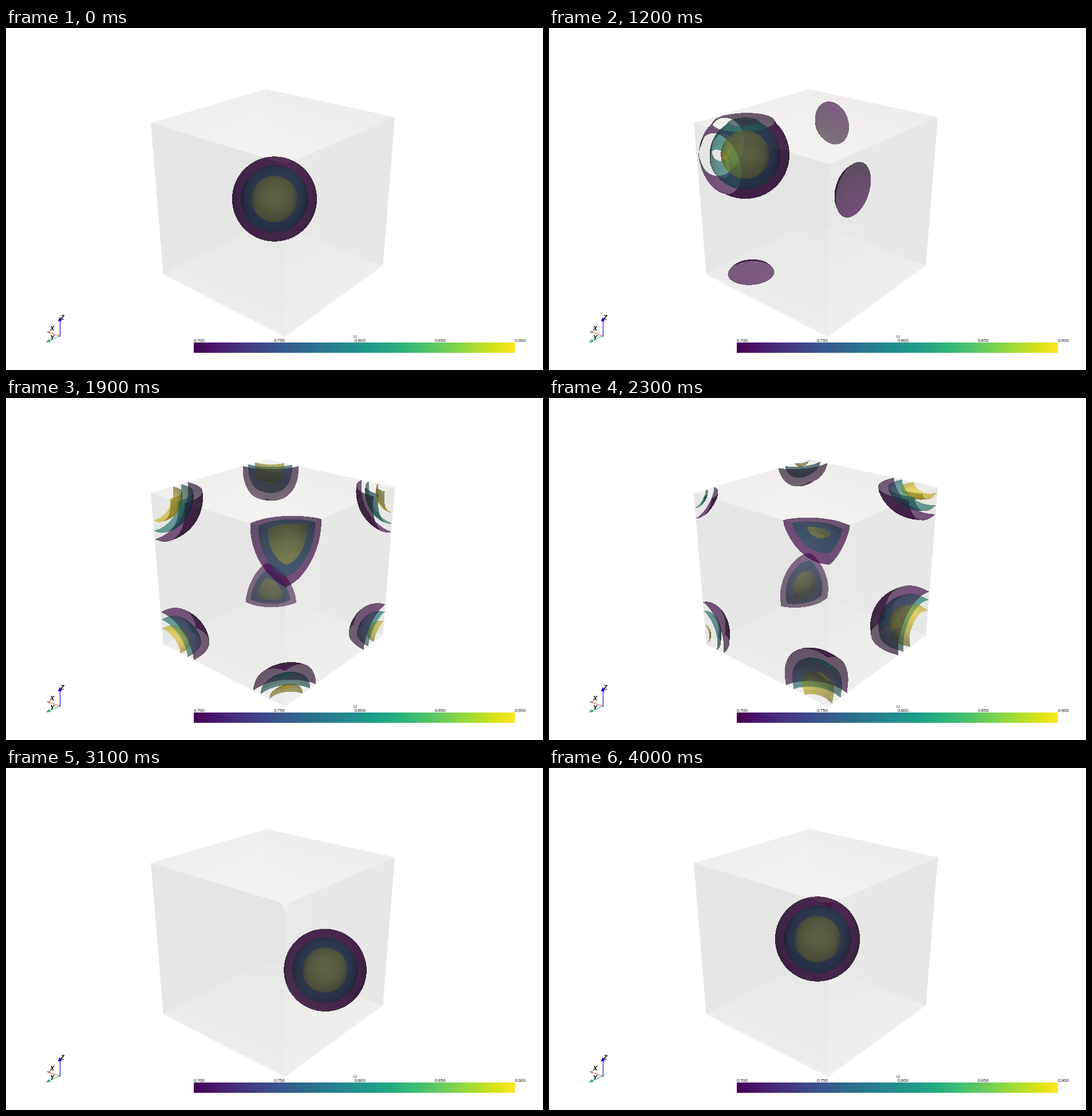
A matplotlib script that plays this animation: 938x597 px, repeating every 4.1 s.

```python
from itertools import product

import numpy as np
import matplotlib.pyplot as plt
from matplotlib.animation import FuncAnimation

W, H, DPI = 938, 597, 100
FRAMES, STEPS = 41, 40

# Camera looking at the middle of the unit cube
EYE = np.array([-1.8, 3.2, 2.1])
MID = np.full(3, 0.5)
FOCAL = H / 2 / np.tan(np.radians(15))
NEAR, FAR = 2.165, 5.634
CORNER_CLIP = 3.063

back = (EYE - MID) / np.linalg.norm(EYE - MID)
right = np.cross([0, 0, 1], back)
right /= np.linalg.norm(right)
up = np.cross(back, right)
VIEW = np.array([right, up, back])

# Iso surfaces: radius and colour
CELL = 0.025
SHELLS = [
    (0.2585, np.array([68, 1, 84]) / 255),
    (0.2055, np.array([33, 145, 140]) / 255),
    (0.1415, np.array([253, 231, 37]) / 255),
]
R_MAX = SHELLS[0][0]
SHELL_ALPHA, CUBE_ALPHA = 0.7, 0.1


def light(elevation, azimuth, power, colour=(1, 1, 1)):
    e, a = np.radians([elevation, azimuth])
    direction = np.array([np.cos(e) * np.sin(a), np.sin(e), np.cos(e) * np.cos(a)])
    return direction, power * np.array(colour)


LIGHTS = [
    light(50, 10, 0.75, (1, 0.972, 0.902)),
    light(-75, 0, 0.25, (0.933, 0.964, 1)),
    light(0, 0, 0.25),
    light(0, 110, 0.214),
    light(0, -110, 0.214),
]
LIGHT_DIRS = np.array([d for d, _ in LIGHTS])
LIGHT_COLS = np.array([c for _, c in LIGHTS])


def shade(normals):
    """Two-sided diffuse light for world-space normals."""
    n = normals @ VIEW.T
    n /= np.linalg.norm(n, axis=1, keepdims=True)
    n[n[:, 2] < 0] *= -1
    return np.minimum(np.maximum(n @ LIGHT_DIRS.T, 0) @ LIGHT_COLS, 1)


def weight(depth, alpha):
    z = FAR / (FAR - NEAR) * (1 - NEAR / depth)
    return alpha * np.maximum(1.1 - z, 0) ** 2


# One ray per pixel, scaled so that t is the view depth
X0, X1, Y0, Y1 = 250, 684, 102, 544
px, py = np.meshgrid(np.arange(X0, X1) + 0.5, np.arange(Y0, Y1) + 0.5)
rays = (-back + ((px.ravel() - W / 2) / FOCAL)[:, None] * right
        + ((H / 2 - py.ravel()) / FOCAL)[:, None] * up)
lo, hi = -EYE / rays, (1 - EYE) / rays
t_in = np.minimum(lo, hi).max(axis=1)
t_out = np.maximum(lo, hi).min(axis=1)
HIT = np.flatnonzero(t_in < t_out)
rays, t_in, t_out = rays[HIT], t_in[HIT], t_out[HIT]
lo, hi = lo[HIT], hi[HIT]
ray_len2 = (rays ** 2).sum(axis=1)
FACE_SHADE = shade(np.eye(3))


class Layers:
    """Weighted, order-independent blending of translucent layers."""

    def __init__(self, num, den, clear):
        self.num, self.den, self.clear = num, den, clear

    def copy(self):
        return Layers(self.num.copy(), self.den.copy(), self.clear.copy())

    def add(self, where, depth, colour, alpha):
        w = weight(depth, alpha)
        self.num[where] += w[:, None] * colour
        self.den[where] += w
        self.clear[where] *= 1 - alpha

    def blend(self):
        mean = self.num / np.maximum(self.den, 1e-9)[:, None]
        return mean * (1 - self.clear)[:, None] + self.clear[:, None]


def cube_layers(clip):
    n = len(rays)
    layers = Layers(np.zeros((n, 3)), np.zeros(n), np.ones(n))
    front = np.minimum(lo, hi).argmax(axis=1)
    rear = np.maximum(lo, hi).argmin(axis=1)
    for depth, face in ((t_in, front), (t_out, rear)):
        keep = np.flatnonzero(depth > clip)
        layers.add(keep, depth[keep], FACE_SHADE[face[keep]], CUBE_ALPHA)
    return layers


CUBE, CUT_CUBE = cube_layers(0), cube_layers(CORNER_CLIP)


def add_ball(layers, centre):
    """Add the shells around centre, stretched in the outermost cells."""
    rel = EYE - centre
    along = rays @ rel
    miss2 = rel @ rel - along ** 2 / ray_len2
    idx = np.flatnonzero(miss2 < (R_MAX + 0.03) ** 2)
    if not len(idx):
        return
    d, start, end = rays[idx], t_in[idx], t_out[idx]
    low = centre < 0.5
    edge = np.where(low, CELL, 1 - CELL)
    gap = np.where(low, centre - R_MAX, 1 - centre - R_MAX)
    knots = [start, end]
    for ax in np.flatnonzero(gap < CELL):
        knots.append(np.clip((edge[ax] - EYE[ax]) / d[:, ax], start, end))
    knots = np.sort(np.array(knots), axis=0)

    for ta, tb in zip(knots[:-1], knots[1:]):
        sub = np.flatnonzero(tb - ta > 1e-9)
        a, b, ds = ta[sub], tb[sub], d[sub]
        mid = EYE + ds * ((a + b) / 2)[:, None]
        outer = np.where(low, mid < edge, mid > edge)
        m = np.where(outer, 0.5, 1.0)
        o = m * EYE + (1 - m) * edge - centre
        v = m * ds
        vv = (v * v).sum(axis=1)
        ov = (o * v).sum(axis=1)
        oo = (o * o).sum(axis=1)
        for radius, colour in SHELLS:
            disc = ov ** 2 - vv * (oo - radius ** 2)
            root = np.sqrt(np.maximum(disc, 0))
            for sign in (-1, 1):
                t = (-ov + sign * root) / vv
                k = np.flatnonzero((disc > 0) & (t > a) & (t <= b))
                if len(k):
                    normal = m[k] * (o[k] + v[k] * t[k][:, None])
                    layers.add(idx[sub[k]], t[k], colour * shade(normal), SHELL_ALPHA)


def render(frame):
    layers = (CUT_CUBE if frame >= 30 else CUBE).copy()
    c = (0.5 + frame / STEPS) % 1
    spots = [c + k for k in (-1, 0, 1) if -R_MAX < c + k < 1 + R_MAX]
    for centre in product(spots, repeat=3):
        add_ball(layers, np.array(centre))
    out = np.ones(((Y1 - Y0) * (X1 - X0), 3))
    out[HIT] = layers.blend()
    return np.clip(out, 0, 1).reshape(Y1 - Y0, X1 - X0, 3)


fig = plt.figure(figsize=(W / DPI, H / DPI), dpi=DPI, facecolor="white")
ax = fig.add_axes([0, 0, 1, 1])
ax.axis("off")
scene = ax.imshow(render(0), extent=(X0, X1, Y1, Y0), interpolation="nearest",
                  aspect="auto", zorder=1)

# Colour bar
ax.imshow(np.linspace(0, 1, 256)[None, :], cmap="viridis", extent=(328, 889, 567, 549),
          interpolation="nearest", aspect="auto", zorder=2)


def label(x, y, text, size, **style):
    ax.text(x, y, text, fontsize=size * 72 / DPI, family="Liberation Sans",
            va="baseline", zorder=5, **style)


for i in range(5):
    label(328 + 140.2 * i, 547.6, f"{0.7 + 0.05 * i:.3f}", 8, color="#1c1c1c")
label(609, 541, "U", 8, color="#1c1c1c", ha="center")


# Orientation axes
def arrow(neck, cone, colour):
    ax.plot([94, neck[0]], [537.5, neck[1]], color=colour, lw=0.8, zorder=3)
    ax.fill(*zip(*cone), color=colour, lw=0, zorder=4)


arrow((76, 531.5), [(70.5, 529.5), (77, 529), (75.5, 533.5)], "#d67052")
arrow((76, 545.8), [(69.5, 548.8), (75, 543), (78, 548)], "#35ad6b")
arrow((94, 511), [(94, 504.5), (97.2, 512), (90.8, 512)], "#1000dc")
for x, y, name in ((80, 528, "X"), (80, 543.5, "Y"), (98, 509, "Z")):
    label(x, y, name, 11, color="black", weight="bold", style="italic", ha="center")

ax.set_xlim(0, W)
ax.set_ylim(H, 0)


def update(frame):
    scene.set_data(render(frame))
    return [scene]


anim = FuncAnimation(fig, update, frames=FRAMES, interval=100, repeat=True, repeat_delay=0)
plt.show()
```
